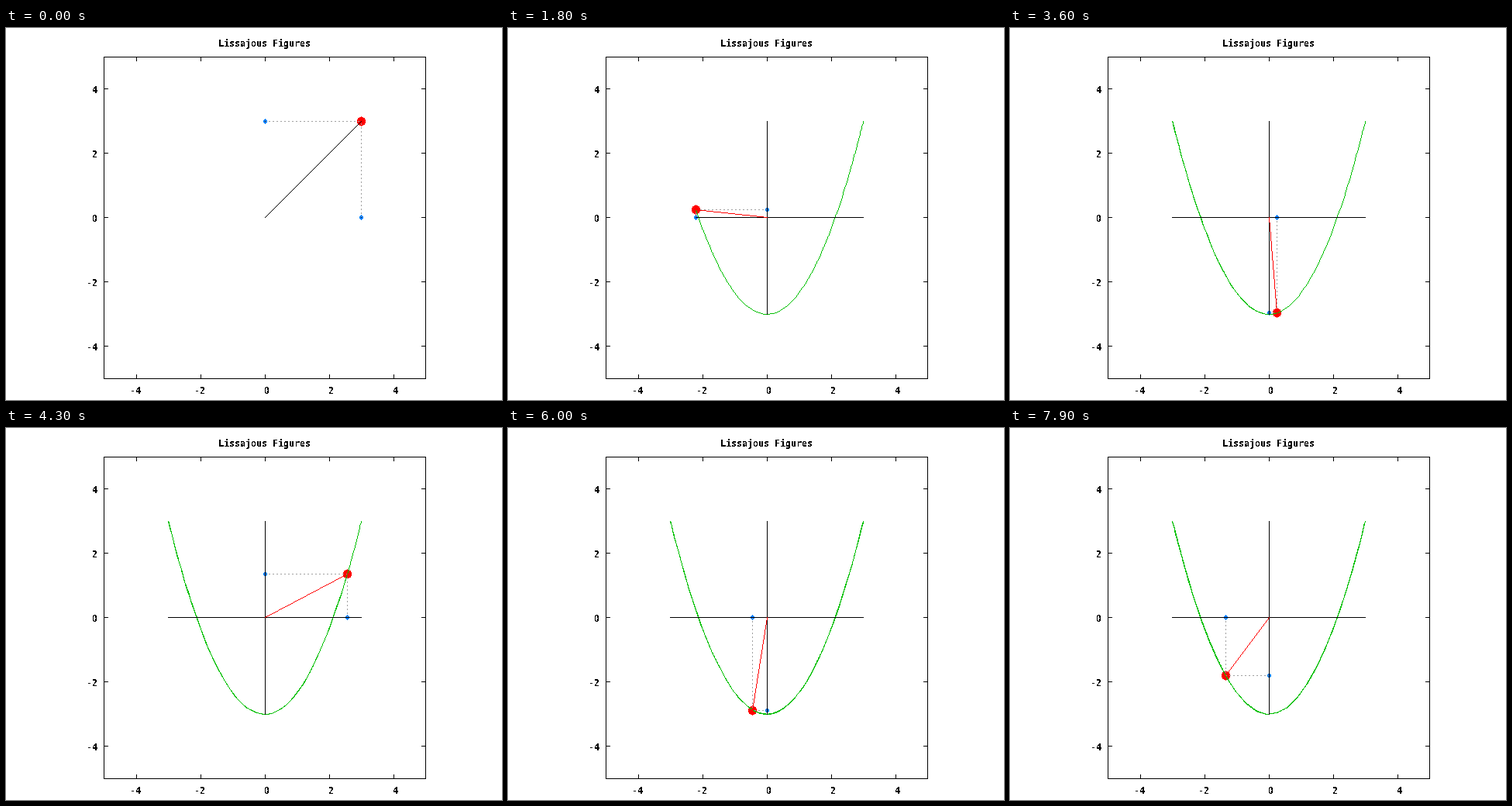
These frames come from a looping animation (640 by 480 pixels, 8 s). A matplotlib script:

```python
import numpy as np
import matplotlib
import matplotlib.pyplot as plt
from matplotlib.animation import FuncAnimation

matplotlib.rcParams["text.antialiased"] = False

W, H, DPI = 640, 480, 80
PX = 72 / DPI              # one pixel in points
CX, CY, UNIT = 334.1, 245.9, 41.5
FRAMES, STEP, AMP, SAMPLES = 80, 2 / 15, 3, 100
LEFT, RIGHT, TOP, BOTTOM, TICK = 126, 541, 38, 453, 5

fig = plt.figure(figsize=(W / DPI, H / DPI), dpi=DPI, facecolor="white")
ax = fig.add_axes([0, 0, 1, 1])
ax.set_xlim(0, W)
ax.set_ylim(H, 0)
ax.axis("off")


def to_px(x, y):
    """Pixel column and row of a point in plot units."""
    return np.floor(CX + UNIT * x), np.floor(CY - UNIT * y)


def stroke(xs, ys):
    """Pixels of a one pixel wide line through the given pixels."""
    cols, rows = [xs[:1]], [ys[:1]]
    for x0, y0, x1, y1 in zip(xs, ys, xs[1:], ys[1:]):
        n = int(max(abs(x1 - x0), abs(y1 - y0)))
        cols.append(np.linspace(x0, x1, n + 1)[1:])
        rows.append(np.linspace(y0, y1, n + 1)[1:])
    return np.rint(np.concatenate(cols)), np.rint(np.concatenate(rows))


def dashed(xs, ys):
    cols, rows = stroke(xs, ys)
    on = np.arange(len(cols)) % 5 < 2
    return cols[on], rows[on]


def disc(x, y, r):
    """Pixels of a dot, slightly taller than wide."""
    dy, dx = np.mgrid[-r:r + 1, -r:r + 1]
    inside = (dx / (r - 0.6)) ** 2 + (dy / r) ** 2 <= 1
    return x + dx[inside], y + dy[inside]


def layer(color):
    return ax.plot([], [], ",", color=color, antialiased=False)[0]


def label(x, y, text, ha="center"):
    # the plain zero has no inner dot
    font = "Liberation Sans" if text == "0" else "DejaVu Sans Mono"
    ax.text(x, y, text, ha=ha, va="baseline", family=font, weight="bold",
            size=(12 if text == "0" else 11.63) * PX)


def draw_frame():
    lines = [([LEFT, RIGHT, RIGHT, LEFT, LEFT],
              [TOP, TOP, BOTTOM, BOTTOM, TOP])]
    for v in range(-4, 5, 2):
        x, y = to_px(v, v)
        for edge, d in ((TOP, TICK), (BOTTOM, -TICK)):
            lines.append(([x, x], [edge, edge + d]))
        for edge, d in ((LEFT, TICK), (RIGHT, -TICK)):
            lines.append(([edge, edge + d], [y, y]))
        label(x + (2.5 if v >= 0 else -0.5), 471.5, str(v))
        label(118.5, y + 5, str(v), "right")
    for xs, ys in lines:
        layer("black").set_data(*stroke(xs, ys))
    label(333, 24, "Lissajous Figures")


draw_frame()
ball, x_dot, y_dot = layer("red"), layer("#0080ff"), layer("#0080ff")
dash_h, dash_v = layer("#a0a0a0"), layer("#a0a0a0")
trail, x_trail, y_trail = layer("#00c000"), layer("black"), layer("black")
radius = layer("red")


def update(n):
    t = np.linspace(0, STEP * n, SAMPLES)
    xs, ys = to_px(AMP * np.cos(t), AMP * np.cos(2 * t))
    ox, oy = to_px(0, 0)
    x, y = xs[-1], ys[-1]
    ball.set_data(*disc(x, y, 6))
    x_dot.set_data(*disc(x, oy, 3))
    y_dot.set_data(*disc(ox, y, 3))
    dash_h.set_data(*dashed([ox, x], [y, y]))
    dash_v.set_data(*dashed([x, x], [oy, y]))
    trail.set_data(*stroke(xs, ys))
    x_trail.set_data(*stroke([xs.min(), xs.max()], [oy, oy]))
    y_trail.set_data(*stroke([ox, ox], [ys.min(), ys.max()]))
    radius.set_data(*stroke([ox, x], [oy, y]))
    radius.set_color("red" if n else "black")
    return (ball, x_dot, y_dot, dash_h, dash_v,
            trail, x_trail, y_trail, radius)


anim = FuncAnimation(fig, update, frames=FRAMES, interval=100,
                     repeat=True, repeat_delay=0)
plt.show()
```
